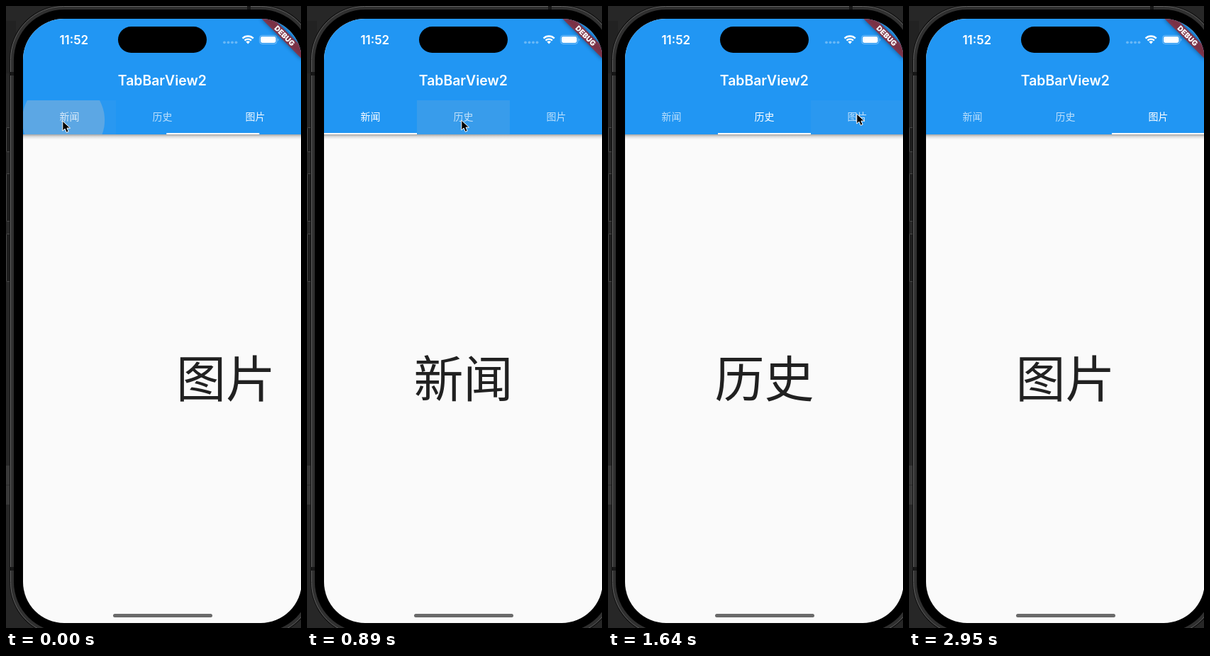
An HTML page for the animation above (2.97 s loop, 416 px wide and 877 px high).

```html
<!DOCTYPE html>
<html lang="zh-CN">
<head>
<meta charset="utf-8">
<title>TabBarView2</title>
<style>
  html, body { margin: 0; width: 100%; height: 100%; overflow: hidden; background: #272727; }
  svg { display: block; width: 416px; height: 877px; }
  .ui { font-family: Inter, "Liberation Sans", sans-serif; fill: #fff; text-anchor: middle; }
  .cjk { font-family: "Noto Sans CJK SC", "Noto Sans CJK", sans-serif; text-anchor: middle; }
</style>
</head>
<body>
<svg viewBox="0 0 416 877" xmlns="http://www.w3.org/2000/svg">
  <defs>
    <clipPath id="screen"><rect x="24" y="18" width="393" height="852" rx="58"/></clipPath>
    <clipPath id="tabClip"><rect id="tabClipRect" y="133" width="131" height="48"/></clipPath>
    <linearGradient id="shade" x2="0" y2="1">
      <stop offset="0" stop-color="#000" stop-opacity=".34"/>
      <stop offset=".45" stop-color="#000" stop-opacity=".12"/>
      <stop offset="1" stop-color="#000" stop-opacity="0"/>
    </linearGradient>
    <filter id="soft" x="-20%" y="-80%" width="140%" height="260%"><feGaussianBlur stdDeviation="3"/></filter>
  </defs>

  <!-- backdrop and phone body -->
  <rect width="416" height="877" fill="#272727"/>
  <rect y="21" width="14" height="74" fill="#222"/>
  <rect y="648" width="5" height="55" fill="#393939"/>
  <path d="M0 675.5H5" stroke="#2b2b2b"/>
  <g fill="#1d1d1d" stroke="#484848">
    <rect x=".5" y="171.5" width="6" height="34" rx="1"/>
    <rect x=".5" y="236.5" width="6" height="67" rx="1"/>
    <rect x=".5" y="321.5" width="6" height="67" rx="1"/>
  </g>
  <rect x="5" y="-1" width="431" height="890" rx="76" fill="#111"/>
  <rect x="6.5" y=".5" width="428" height="887" rx="75" fill="#303030" stroke="#616161"/>
  <path d="M6 95.5H11M6 793.5H11M342.5 0V5" stroke="#161616" stroke-width="5"/>
  <rect x="11" y="5" width="419" height="878" rx="71" fill="#000"/>

  <g clip-path="url(#screen)">
    <rect x="24" y="18" width="393" height="852" fill="#fafafa"/>
    <g id="pages" class="cjk" font-size="70" fill="#212121"></g>
    <rect x="24" y="181" width="393" height="7" fill="url(#shade)"/>
    <rect x="24" y="18" width="393" height="163" fill="#2196f3"/>
    <g clip-path="url(#tabClip)">
      <rect id="glow" y="133" width="131" height="48" fill="#bcbcbc"/>
      <circle id="ripple" fill="#c8c8c8"/>
    </g>
    <g id="tabs" class="cjk" font-size="14" fill="#fff"></g>
    <rect id="bar" y="179" width="131" height="2" fill="#fff"/>
    <text class="ui" x="220.3" y="112" font-size="19.4" font-weight="600">TabBarView2</text>

    <!-- status bar -->
    <text class="ui" x="95.8" y="53.5" font-size="17" font-weight="600">11:52</text>
    <g id="dots" fill="#fff" fill-opacity=".32"></g>
    <g fill="none" stroke="#fff" stroke-width="2.4">
      <path d="M333.6 45.6A10.8 10.8 0 0 1 348.8 45.6"/>
      <path d="M336.5 48.6A6.7 6.7 0 0 1 345.9 48.6"/>
    </g>
    <path d="M341.2 53.4L338.4 50.5A4 4 0 0 1 344 50.5Z" fill="#fff"/>
    <rect x="357.5" y="41.5" width="24.5" height="12" rx="3.8" fill="none" stroke="#fff" stroke-opacity=".4"/>
    <rect x="359" y="43" width="21.5" height="9" rx="2.4" fill="#fff"/>
    <path d="M383.3 45.6Q385.6 47.5 383.3 49.6Z" fill="#fff" fill-opacity=".5"/>
    <rect x="158" y="29" width="125" height="37" rx="18.5" fill="#000"/>

    <g transform="translate(417 18) rotate(45)">
      <rect x="-40" y="28" width="80" height="12" fill="#000" opacity=".45" filter="url(#soft)"/>
      <rect x="-40" y="28" width="80" height="12" fill="#b71c1c" fill-opacity=".63"/>
      <text class="ui" y="37.7" font-size="10.2" font-weight="900">DEBUG</text>
    </g>
    <rect x="151" y="857" width="140" height="5" rx="2.5" fill="#6a6a6a"/>
  </g>
  <path id="cursor" d="M.8 1.2V15L4 12L6.3 17.3L9.2 16.1L7 11.1H11.6Z" fill="#000" stroke="#fff" stroke-linejoin="round"/>
</svg>
<script>
const LOOP = 2970, LEFT = 24, PAGE = 393, TAB = 131, SLIDE = 300;
const names = ["新闻", "历史", "图片"];

// Pointer samples: time, x, y; the picture holds between them.
const pointer = [
  [0, 79, 161], [150, 79, 161], [290, 101, 163], [440, 198, 163], [590, 209, 163],
  [740, 217, 160], [890, 217, 160], [1040, 222, 160], [1190, 327, 151], [1340, 332, 150],
  [1490, 350, 150], [1640, 350, 151], [1780, 350, 151], [1930, 350, 151], [2080, 350, 205],
  [2220, 364, 661], [2370, 376, 769], [2520, 381, 840], [2670]
];
const taps = [
  { at: -51, from: 2, to: 0, x: 81, y: 161 },
  { at: 955, from: 0, to: 1, x: 219, y: 161 },
  { at: 1746, from: 1, to: 2, x: 351, y: 152 }
];
const presses = [{ at: 890, tab: 1, glow: .15 }, { at: 1640, tab: 2, glow: .06 }];

const $ = id => document.getElementById(id);
const set = (el, attrs) => { for (const k in attrs) el.setAttribute(k, attrs[k]); return el; };
const add = (parent, tag, attrs, text = "") => {
  const el = set(document.createElementNS("http://www.w3.org/2000/svg", tag), attrs);
  el.textContent = text;
  return parent.appendChild(el);
};
const clamp = v => Math.min(1, Math.max(0, v));

const pages = names.map(n => add($("pages"), "text", { y: 551.5 }, n));
const tabs = names.map((n, i) => add($("tabs"), "text", { x: LEFT + TAB * (i + .5), y: 161 }, n));
for (let i = 0; i < 4; i++) add($("dots"), "circle", { cx: 308 + 5.5 * i, cy: 51.3, r: 1.9 });

// cubic-bezier(.25, .1, .25, 1)
function ease(x) {
  const curve = (a, b, u) => 3 * a * u * (1 - u) ** 2 + 3 * b * u * u * (1 - u) + u ** 3;
  let lo = 0, hi = 1;
  for (let i = 0; i < 24; i++) {
    const mid = (lo + hi) / 2;
    if (curve(.25, .25, mid) < x) lo = mid; else hi = mid;
  }
  return curve(.1, 1, lo);
}

function drawPages(tap, p) {
  const dir = Math.sign(tap.to - tap.from);
  pages.forEach((el, i) => {
    const shift = i === tap.to ? dir * (1 - p) : -dir * p;
    const shown = i === tap.to || (i === tap.from && p < 1);
    set(el, { x: LEFT + PAGE * (.5 + shift), visibility: shown ? "visible" : "hidden" });
  });
  tabs.forEach((el, i) => {
    const on = i === tap.to ? p : i === tap.from ? 1 - p : 0;
    set(el, { "fill-opacity": .7 + .3 * on });
  });
  set($("bar"), { x: LEFT + TAB * (tap.from + (tap.to - tap.from) * p) });
}

function drawInk(t, tap, age) {
  const press = presses.find(b => t >= b.at && t < b.at + 140);
  const x = LEFT + TAB * (press ? press.tab : tap.to);
  const fade = press ? 0 : clamp(1 - age / 190);
  const live = fade > .1 ? fade : 0;
  set($("tabClipRect"), { x });
  set($("glow"), { x, opacity: press ? press.glow : .07 * live });
  set($("ripple"), { cx: tap.x, cy: tap.y, r: 25 + .65 * Math.min(age, 200), opacity: .44 * live });
}

function draw(now) {
  const [t, x, y] = pointer.findLast(s => s[0] <= now);
  const tap = taps.findLast(s => s.at <= t);
  const age = t - tap.at;
  drawPages(tap, age >= SLIDE ? 1 : ease(age / SLIDE));
  drawInk(t, tap, age);
  set($("cursor"), x === undefined
    ? { visibility: "hidden" }
    : { visibility: "visible", transform: `translate(${x} ${y})` });
}

const start = performance.now();
function tick() {
  draw((performance.now() - start) % LOOP);
  requestAnimationFrame(tick);
}
tick();
</script>
</body>
</html>
```
